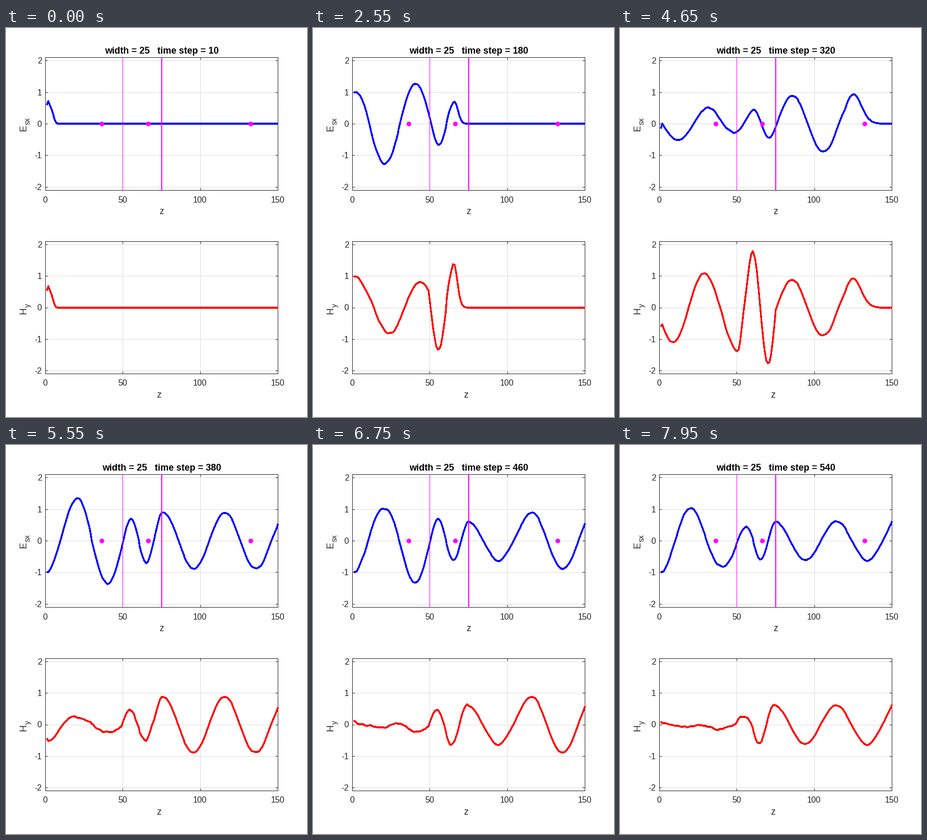
Write a matplotlib script that moves like this. It is 576 by 744 pixels and loops after 8 s.

```python
import numpy as np
import matplotlib.pyplot as plt
from matplotlib.animation import FuncAnimation

WIDTH, HEIGHT, DPI = 576, 744, 100
PT = 72 / DPI                      # points per pixel
LEFT, RIGHT = 75.5, 520.5
INK, GRID, MAGENTA = "#262626", "#dedede", "#ff00ff"
CELLS, PERIOD = 150, 80
STEPS_PER_POSE, POSES = 10, 54
FRAME_MS, FRAMES_PER_POSE, FRAMES = 50, 3, 160

plt.rcParams["font.family"] = "Liberation Sans"


def simulate():
    """1D FDTD wave through a dielectric slab; fields indexed by z."""
    e, h = np.zeros(CELLS + 1), np.zeros(CELLS + 1)
    gain = np.full(CELLS + 1, 0.5)
    gain[50:76] /= 4
    e_past = [(0, 0), (0, 0)]
    h_past = [(0, 0), (0, 0)]
    poses = []
    for step in range(1, POSES * STEPS_PER_POSE + 1):
        e[2:-1] += gain[2:-1] * (h[1:-2] - h[2:-1])
        e[2] = np.sin(2 * np.pi * step / PERIOD)
        e[1], e[-1] = e_past.pop(0)
        e_past.append((e[2], e[-2]))
        h[1:-1] += 0.5 * (e[1:-1] - e[2:])
        h[1], h[-1] = h_past.pop(0)
        h_past.append((h[2], h[-2]))
        if step % STEPS_PER_POSE == 0:
            poses.append((e[1:].copy(), h[1:].copy()))
    return poses


def px(z):
    return LEFT + np.asarray(z) * (RIGHT - LEFT) / CELLS


def pixel_centre(coord):
    return np.floor(coord) + 0.5


class Panel:
    def __init__(self, top, bottom):
        self.top, self.bottom = top, bottom
        self.mid = (top + bottom) / 2
        self.unit = (bottom - top) / 4.2

    def py(self, value):
        return self.mid - value * self.unit

    def snapped(self, values):
        return np.floor(self.mid) - np.round(values * self.unit)


fig = plt.figure(figsize=(WIDTH / DPI, HEIGHT / DPI), dpi=DPI, facecolor="white")
ax = fig.add_axes([0, 0, 1, 1])
ax.set_xlim(0, WIDTH)
ax.set_ylim(HEIGHT, 0)
ax.axis("off")


def stroke(xs, ys, color, width=1, z=1, **kw):
    kw = {"solid_capstyle": "butt", "solid_joinstyle": "round",
          "snap": False, **kw}
    return ax.plot(xs, ys, color=color, lw=width * PT, zorder=z, **kw)[0]


def hairline(x0, x1, y0, y1, color, z=1):
    """One-pixel horizontal or vertical line that fills whole pixels."""
    if x0 == x1:
        x0 = x1 = pixel_centre(x0)
    else:
        y0 = y1 = pixel_centre(y0)
    stroke([x0, x1], [y0, y1], color, z=z)


def label(x, y, text, size=16, ha="center", color=INK, **kw):
    return ax.text(x, y, text, fontsize=size * PT, ha=ha, va="baseline",
                   color=color, rotation_mode="anchor", **kw)


def draw_panel(panel, z_label_x, name, subscript, name_y, sub_y):
    top, bottom = panel.top, panel.bottom
    for z in (50, 100):
        hairline(px(z), px(z), top, bottom, GRID)
    for value in range(-2, 3):
        y = panel.py(value)
        hairline(LEFT, RIGHT, y, y, GRID)
        hairline(LEFT, LEFT + 4.5, y, y, INK, z=2)
        hairline(RIGHT - 4.5, RIGHT, y, y, INK, z=2)
        label(68.7, y + 5.5, str(value), ha="right")
    for z in (0, 50, 100, 150):
        hairline(px(z), px(z), top, top + 4.5, INK, z=2)
        hairline(px(z), px(z), bottom - 4.5, bottom, INK, z=2)
        label(px(z) - 0.7, bottom + 23, str(z))
    stroke([LEFT, RIGHT, RIGHT, LEFT, LEFT], [top, top, bottom, bottom, top],
           INK, z=2, solid_joinstyle="miter", solid_capstyle="projecting")
    label(z_label_x, bottom + 45.5, "z", 17.6)
    label(39, name_y, name, 17.6, ha="left", rotation=90)
    label(46, sub_y, subscript, 14.1, ha="left", rotation=90)


upper, lower = Panel(56.5, 310.5), Panel(408.5, 661.5)
draw_panel(upper, 298, "E", "sx", 197, 184.7)
draw_panel(lower, 293, "H", "y", 547, 533.8)

title = label(298, 49, "", 17.6, color="black", weight="bold")
cells_x = np.round(px(np.arange(1, CELLS + 1)))
cells_x[-1] = RIGHT
e_line = stroke(cells_x, 0 * cells_x, "#0000ff", 2.3, z=3, antialiased=False)
h_line = stroke(cells_x, 0 * cells_x, "#ff0000", 2.3, z=3, antialiased=False)

hairline(px(50), px(50), upper.top, upper.bottom, MAGENTA, z=4)
stroke([px(75)] * 2, [upper.top, upper.bottom], MAGENTA, 2, z=4)
dots_x = pixel_centre(px([36, 66, 132]))
ax.plot(dots_x, [182.5] * 3, "o", color=MAGENTA, ms=9 * PT, mew=0,
        zorder=5, snap=False)

poses = simulate()


def update(frame):
    pose = frame // FRAMES_PER_POSE
    e, h = poses[pose]
    e_line.set_ydata(upper.snapped(e))
    h_line.set_ydata(lower.snapped(h))
    title.set_text(f"width = 25   time step = {(pose + 1) * STEPS_PER_POSE}")
    return e_line, h_line, title


anim = FuncAnimation(fig, update, frames=FRAMES, interval=FRAME_MS,
                     repeat=True, repeat_delay=0)
plt.show()
```
